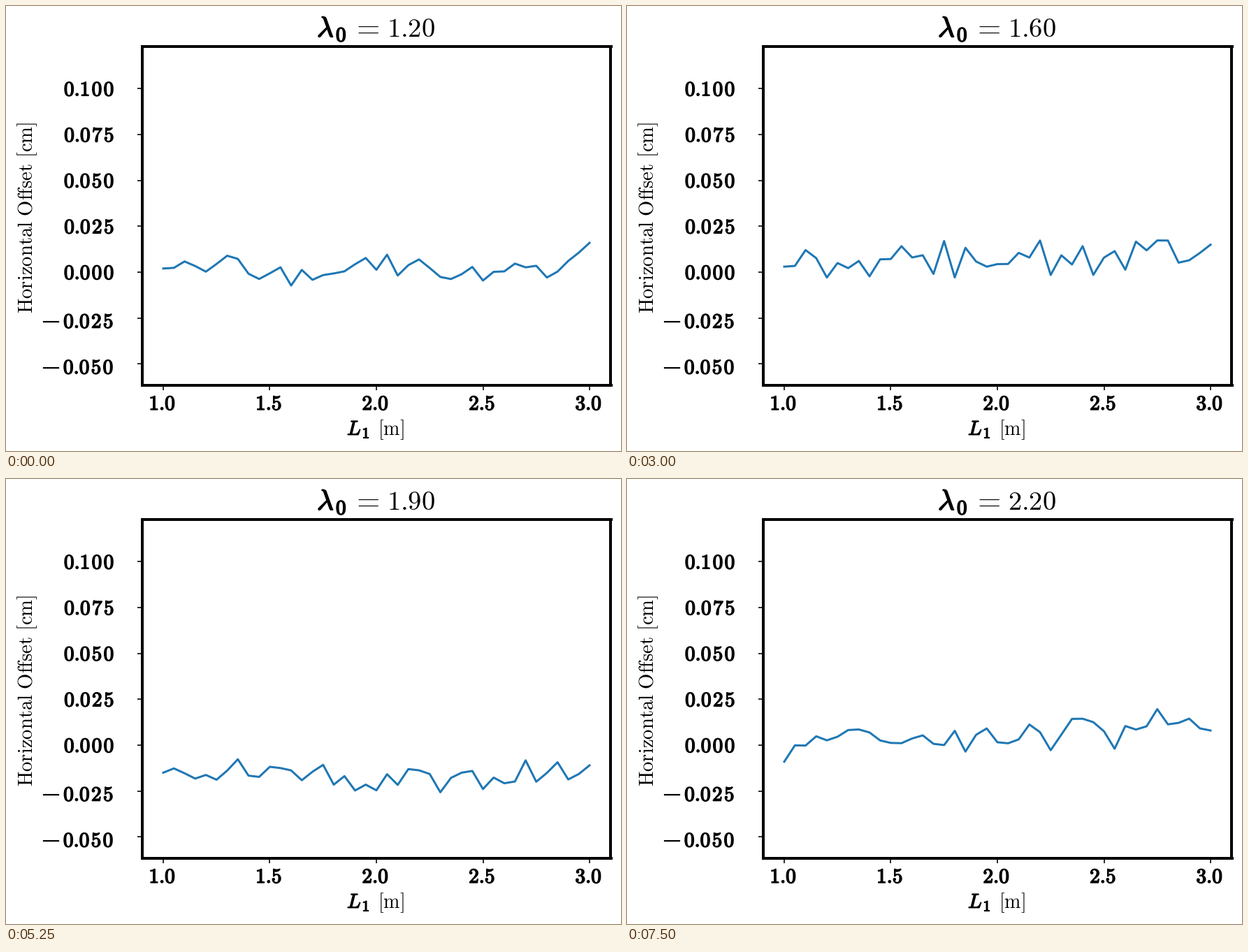
Write a matplotlib script that moves like this. It is 880 by 637 pixels and loops after 8 s.

```python
import numpy as np
import matplotlib.pyplot as plt
from matplotlib.animation import FuncAnimation
from matplotlib.patheffects import withStroke

W, H, DPI = 880, 637, 64
PX = 72 / DPI                      # points per pixel
TICK_MS, TICKS_PER_STEP, TICKS = 250, 3, 32
N = 41
GAP = r"\hspace{0.09}"
plt.rcParams["mathtext.fontset"] = "cm"

# Per curve, in 1e-3 cm: level at the left and right, first and last value.
TRENDS = {
    1.2: (3, 1, 2, 16), 1.3: (-5, -8, -10, 0), 1.4: (-8, -18, -9, -20),
    1.5: (-10, -28, -9, -35), 1.6: (4, 12, 3, 15), 1.7: (2, 24, 2, 17),
    1.8: (4, 12, 4, 10), 1.9: (-14, -15, -15, -11), 2.0: (16, 29, 14, 46),
    2.1: (8, 14, 9, 12), 2.2: (3, 11, -9, 8),
}

x = np.linspace(1, 3, N)


def curve(seed, left, right, first, last):
    """Noise around a straight trend, with fixed end values."""
    noise = np.random.default_rng(seed).normal(0, 1, N).clip(-1.9, 1.9)
    y = np.linspace(left, right, N) + noise * np.linspace(4.5, 6.5, N)
    y[0], y[-1] = first, last
    return y


labels = [f"{v:.2f}" for v in TRENDS]
curves = [curve(i, *trend) for i, trend in enumerate(TRENDS.values())]

fig = plt.figure(figsize=(W / DPI, H / DPI), dpi=DPI, facecolor="white")


def put(px, py, tex, em, bold=0, **kw):
    """Place math text with its baseline at a pixel position."""
    t = fig.text(px / W, 1 - py / H, f"${tex}$", fontsize=em * PX,
                 va="baseline", **kw)
    if bold:
        t.set_path_effects([withStroke(linewidth=bold * PX,
                                       foreground="black")])
    return t


def put_number(px, py, text, ha):
    whole, part = text.split(".")
    put(px, py, rf"\mathrm{{{whole}.{GAP.join(part)}}}", 29.3, bold=1.5,
        ha=ha)


ax = fig.add_axes([194.5 / W, 1 - 542.5 / H, 671 / W, 485 / H])
ax.set(xlim=(0.9, 3.1), ylim=(-61.5, 123.2))
x_ticks, y_ticks = np.arange(1, 3.1, 0.5), np.arange(-50, 101, 25)
ax.set_xticks(x_ticks)
ax.set_yticks(y_ticks)
ax.tick_params(length=7 * PX, width=1.6 * PX,
               labelbottom=False, labelleft=False)
for spine in ax.spines.values():
    spine.set_linewidth(4 * PX)
line, = ax.plot(x, curves[0], color="#1f77b4", lw=3 * PX)

for v in x_ticks:
    put_number(223.5 + 305 * (v - 1), 578, f"{v:.1f}", "center")

for v in y_ticks:
    mid = 381 - 2.626 * v + (4.5 if v < 0 else 0.5)
    put_number(154 if v < 0 else 155, mid + 9.5, f"{abs(v) / 1000:.3f}",
               "right")
    if v < 0:
        fig.add_artist(plt.Line2D([54 / W, 75 / W], [1 - (mid + 1) / H] * 2,
                                  color="black", lw=2.2 * PX))

put(488, 614, "L", 29, bold=1.3)
put(509.5, 618.5, r"\mathrm{1}", 21.5, bold=1.3)
put(532, 614, r"\mathrm{[m]}", 28)
put(38, 440, r"\mathrm{Horizontal\ Offset\ [cm]}", 28.7, rotation=90,
    rotation_mode="anchor", ha="left")

put(445, 44, r"\lambda", 41, bold=1.7)
put(472, 50.5, r"\mathrm{0}", 29, bold=1.7)
put(493.5, 44, "=", 43)
value = put(545, 44, r"\mathrm{1.20}", 38.5)


def update(i):
    step = i // TICKS_PER_STEP
    line.set_ydata(curves[step])
    value.set_text(rf"$\mathrm{{{labels[step]}}}$")
    return line, value


anim = FuncAnimation(fig, update, frames=TICKS, interval=TICK_MS,
                     repeat=True, repeat_delay=0)
plt.show()
```
